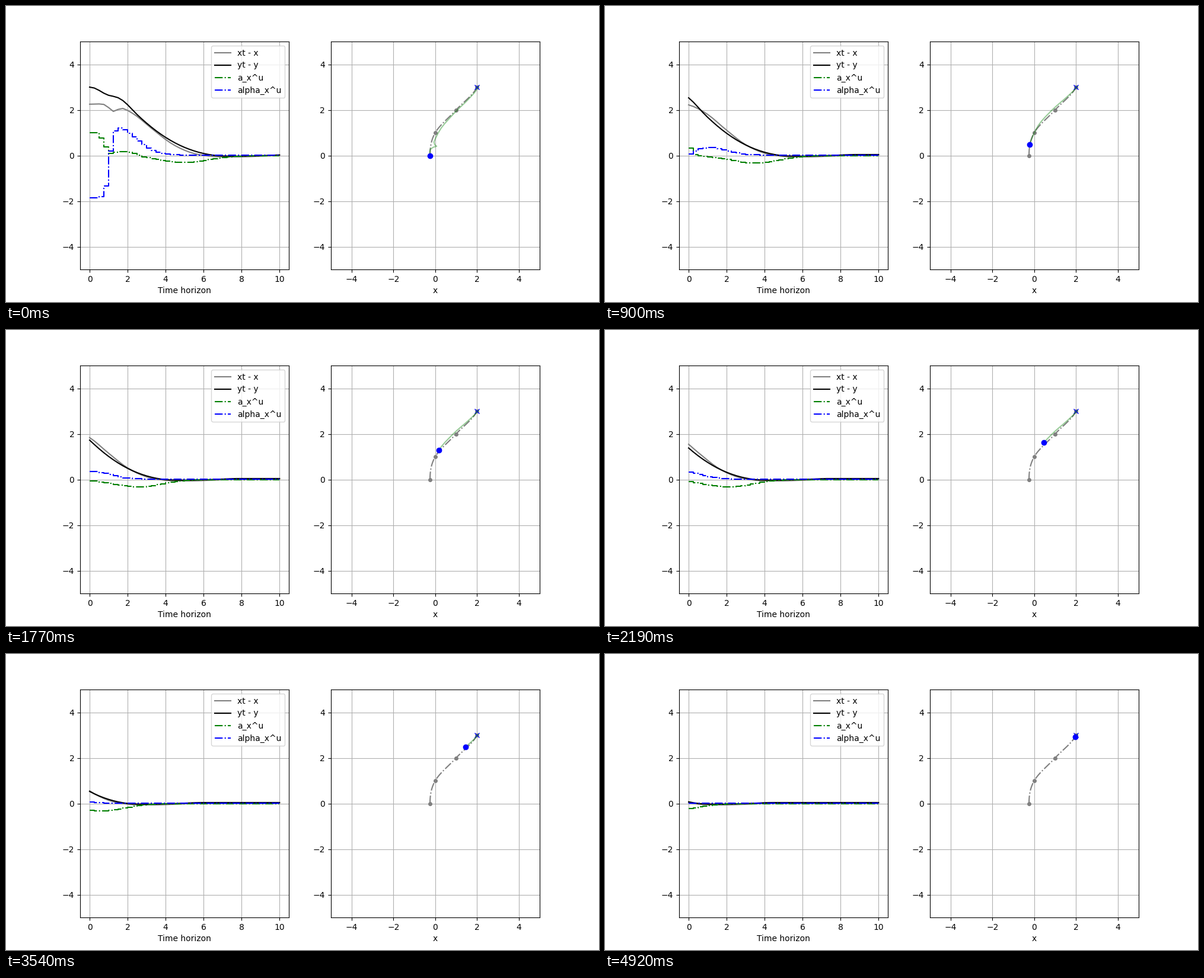
A matplotlib script that plays this animation: 1000x500 px, repeating every 4.95 s.

```python
import numpy as np
import matplotlib.pyplot as plt
from matplotlib.animation import FuncAnimation

FRAMES, INTERVAL = 165, 30
FPS = 30
GOAL_X, GOAL_Y = 2, 3
t = np.arange(41) * 0.25


def smooth(keys, start=0, end=0):
    """Hermite curve through values at 0, 1, 2, ... with given end slopes."""
    k = np.array(keys, float)
    m = np.gradient(k)
    m[0], m[-1] = start, end

    def curve(x):
        x = np.clip(x, 0, len(k) - 1)
        i = np.minimum(x.astype(int), len(k) - 2)
        s = x - i
        ease = s * s * (3 - 2 * s)
        return (k[i] + (k[i + 1] - k[i]) * ease
                + s * (1 - s) * ((1 - s) * m[i] - s * m[i + 1]))

    return curve


def bell(x, mid, width):
    return np.exp(-((x - mid) / width) ** 2)


def switch(x, mid, rate):
    return 1 / (1 + np.exp(-rate * (x - mid)))


# Distance to the goal, one key per second
err_x = smooth([2.25, 2.22, 1.82, 1.15, .52, .13, -.03, -.06, -.05, -.02, .02])
err_y = smooth([3, 2.53, 1.70, 1.01, .5, .17, 0, -.03, -.02, .01, .04])


def warm_plan(now):
    """Settled plan: a window sliding along one fixed motion."""
    T = now + t
    ahead = now + 1.03 * t
    accel = np.clip(1.48 - 1.15 * T, 0, 1) - .33 * bell(T, 4.4, 1.8)
    alpha = .02 + .33 * bell(T, 2, 1.3) - .8 * bell(T, 0, .77)
    return np.array([err_x(ahead), err_y(ahead), accel, alpha])


def cold_plan():
    """First rough plan: a hard turn that makes the motion lag."""
    lag = switch(t, 1.2, 5)
    x = err_x(t - .32 * lag) - .27 * bell(t, 1.25, .3)
    y = err_y(t - .62 * lag)
    accel = (np.clip(1.6 - 1.7 * t, 0, 1) + .2 * bell(t, 1.7, .8)
             - .3 * bell(t, 4.85, 1.9))
    turn = switch(t, .92, 9)
    alpha = .02 - 1.89 * (1 - turn) + 1.22 * bell(t, 1.3, 1.45) * turn
    return np.array([x, y, accel, alpha])


COLD = cold_plan()


def plan(n):
    w = np.exp(-n / 3)
    return w * COLD + (1 - w) * warm_plan(n / FPS)


fig, (left, right) = plt.subplots(1, 2, figsize=(10, 5), dpi=100)

dashed = dict(linestyle="-.", drawstyle="steps-post")
lines = [
    left.plot([], [], color="gray", label="xt - x")[0],
    left.plot([], [], color="black", label="yt - y")[0],
    left.plot([], [], color="green", label="a_x^u", **dashed)[0],
    left.plot([], [], color="blue", label="alpha_x^u", **dashed)[0],
]
left.set(xlim=(-.5, 10.5), ylim=(-5, 5), xlabel="Time horizon")
left.grid()
left.legend(loc="upper right")

way_x = [-.25, 0, 1, 2]
way_y = np.linspace(0, 3, 121)
right.plot(smooth(way_x, end=.5)(way_y), way_y, "-.", color="gray")
right.plot(way_x, range(4), "o", color="gray", markersize=4)
right.plot(GOAL_X, GOAL_Y, "x", color="blue")
track, = right.plot([], [], color="green", alpha=0.4)
robot, = right.plot([], [], "o", color="blue")
right.set(xlim=(-5, 5), ylim=(-5, 5), xlabel="x")
right.set_xticks(range(-4, 5, 2))
right.grid()


def draw(n):
    data = plan(n)
    for line, values in zip(lines, data):
        line.set_data(t, values)
    x, y = GOAL_X - data[0], GOAL_Y - data[1]
    track.set_data(x, y)
    robot.set_data(x[:1], y[:1])
    return [*lines, track, robot]


anim = FuncAnimation(fig, draw, frames=FRAMES, interval=INTERVAL,
                     init_func=lambda: draw(0), repeat=True, repeat_delay=0)
plt.show()
```
